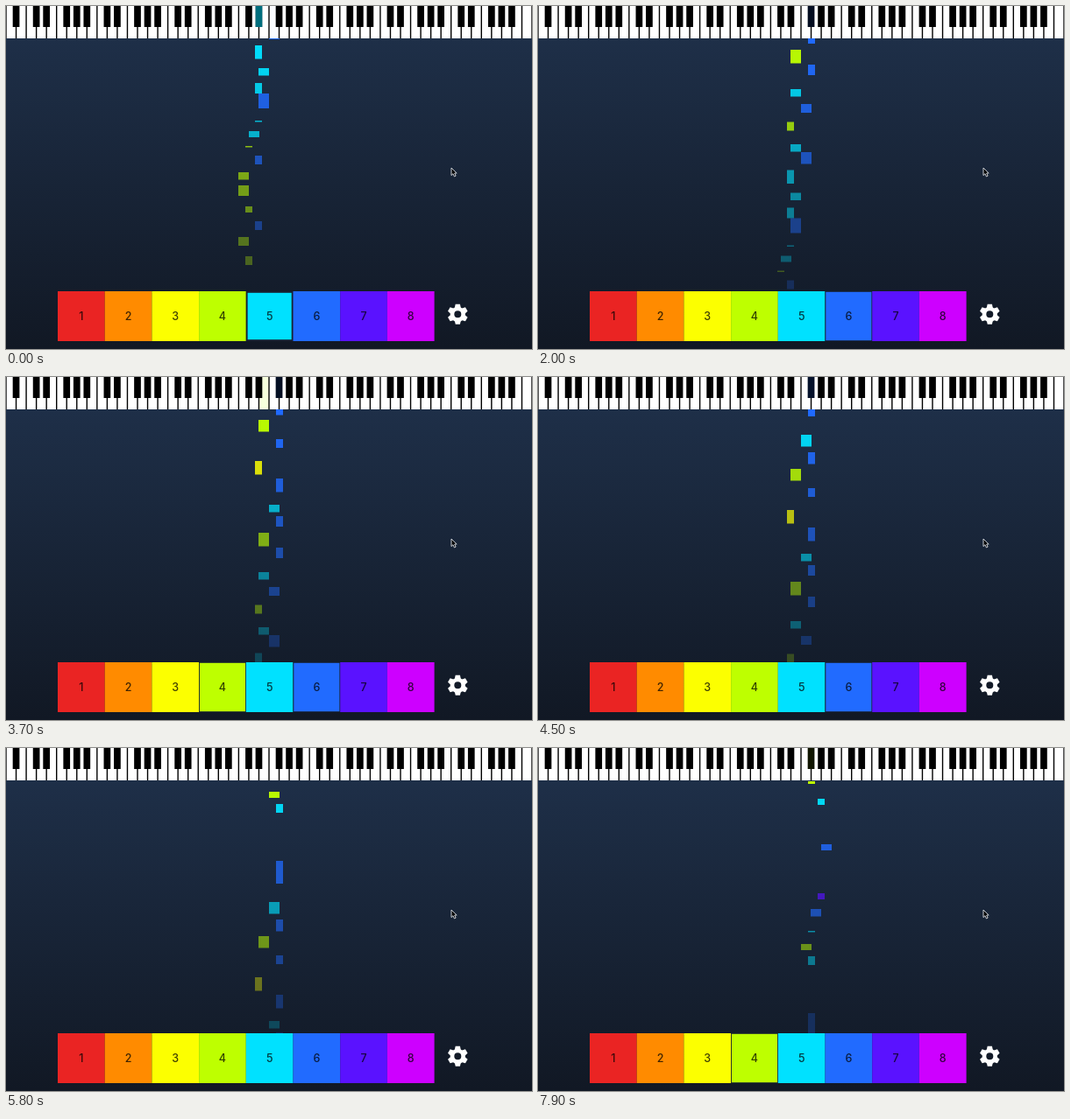
Animation, 600 px wide and 392 px high, one loop 8000 ms. Source, as an HTML page with a canvas:

```html
<!DOCTYPE html>
<html lang="en">
<head>
<meta charset="utf-8">
<title>Eight button piano</title>
<style>
html, body { margin: 0; width: 100%; height: 100%; overflow: hidden; background: #131b28; }
canvas { display: block; width: 600px; height: 392px; }
</style>
</head>
<body>
<canvas id="stage" width="600" height="392"></canvas>
<script>
const canvas = document.getElementById('stage');
const ctx = canvas.getContext('2d');
const W = 600, H = 392, LOOP = 8000, STEP = 100;
const KEY_W = W / 52, KEY_H = 37, BLACK_W = 7.7, BLACK_H = 24;
const BTN_X = 59, BTN_Y = 326, BTN_W = 53.7, BTN_H = 57;
const COLORS = ['#ea2423', '#ff8b00', '#fcff00', '#beff00',
                '#00e1ff', '#216bff', '#5a12ff', '#cd00ff'];

// Distance scrolled at a few moments: [ms, px]
const SCROLL = [[0, 0], [1000, 77.5], [2000, 142.5], [3000, 221.5],
                [4500, 326.5], [5800, 436.5], [7900, 610.5]];

// Note lengths in px
const tap = 1.5, brief = 7, short = 8.5, mid = 10, wide = 12,
      long = 13.5, longer = 15.5, held = 26;

const notes = [];

// Whole keys are black, halves white; each entry is a top at time zero
function lane(key, button, height, ...tops) {
  for (const top of tops) notes.push({ key, button, height, top });
}

lane(23.5, 4, mid, 264);
lane(23.5, 4, wide, 205);
lane(23.5, 4, short, 190);
lane(24, 4, mid, 286);
lane(24, 4, brief, 229);
lane(24, 4, tap, 160);
lane(24.5, 5, brief, 143);
lane(25, 3, longer, -174.5);
lane(25, 4, mid, -10);
lane(25, 5, tap, 131);
lane(25, 5, wide, 88);
lane(25, 5, longer, 45);
lane(25, 6, mid, 246, 171);
lane(25.5, 4, longer, -92.5);
lane(25.5, 4, long, -221.5);
lane(25.5, 5, short, 71, 15.5, -47.5);
lane(25.5, 6, longer + 1.5, 100);
lane(26.5, 4, brief, -386.5);
lane(26.5, 5, short, -124.5);
lane(26.5, 5, long, -260.5);
lane(26.5, 6, long, 24.5);
lane(26.5, 6, mid, -30.5);
lane(27, 4, tap * 2, -572.5);
lane(27, 5, mid, -372.5);
lane(27, 5, tap, -401.5);
lane(27, 6, wide, -75.5, -111.5);
lane(27, 6, longer, -154.5);
lane(27, 6, mid, -199.5);
lane(27, 6, long, -240.5);
lane(27, 6, held, -307.5);
lane(27.5, 6, short, -426.5);
lane(28, 5, brief, -552.5);
lane(28, 7, brief, -444.5);
lane(28.5, 6, brief, -500.5);

const clamp = v => Math.max(0, Math.min(1, v));
const isBlack = key => Number.isInteger(key);

function scrollAt(t) {
  let i = 1;
  while (i < SCROLL.length - 1 && t > SCROLL[i][0]) i++;
  const [t0, d0] = SCROLL[i - 1], [t1, d1] = SCROLL[i];
  return d0 + (d1 - d0) * (t - t0) / (t1 - t0);
}

function rect(color, x, y, w, h, alpha = 1) {
  ctx.globalAlpha = alpha;
  ctx.fillStyle = color;
  ctx.fillRect(x, y, w, h);
  ctx.globalAlpha = 1;
}

// How strongly a note lights its key and button
function glow(note, scroll) {
  const gap = note.top + scroll - KEY_H;
  const age = gap + note.height;
  if (age <= 0 || gap > 12.5) return 0;
  return Math.min(0.55, age / 48) * clamp((12.5 - gap) / 2);
}

function drawBackground() {
  const g = ctx.createLinearGradient(0, KEY_H, 0, H);
  g.addColorStop(0, '#1e2f48');
  g.addColorStop(1, '#111824');
  rect(g, 0, 0, W, H);
}

function drawNotes(scroll) {
  for (const n of notes) {
    const top = Math.max(KEY_H, n.top + scroll);
    const bottom = n.top + scroll + n.height;
    if (bottom <= KEY_H || top > BTN_Y) continue;
    const depth = clamp(((top + bottom) / 2 - KEY_H) / 350);
    const w = isBlack(n.key) ? 8 : 12;
    const x = Math.round(n.key * KEY_W - w / 2);
    rect(COLORS[n.button - 1], x, top, w, bottom - top, 1 - depth ** 1.15);
  }
}

function drawKeys(lit) {
  rect('#000', 0, 0, W, KEY_H);
  for (let i = 0; i < 52; i++) {
    const x = i * KEY_W + 0.7, w = KEY_W - 1.4;
    rect('#fff', x, 0, w, KEY_H);
    const hit = lit.get(i + 0.5);
    if (hit) rect(COLORS[hit.button - 1], x, 0, w, KEY_H, hit.level);
  }
  for (let i = 1; i < 52; i++) {
    if (i % 7 === 2 || i % 7 === 5) continue;
    const x = i * KEY_W - BLACK_W / 2;
    rect('#000', x, 0, BLACK_W, BLACK_H);
    const hit = lit.get(i);
    if (hit) rect(COLORS[hit.button - 1], x, 0, BLACK_W, BLACK_H, hit.level);
  }
}

function drawButtons(levels) {
  ctx.font = '500 12.5px Inter, "Open Sans", sans-serif';
  ctx.textAlign = 'center';
  ctx.textBaseline = 'middle';
  COLORS.forEach((color, i) => {
    const x = BTN_X + i * BTN_W, level = levels[i];
    const inset = level > 0.45 ? 1.8 : level > 0.08 ? 0.8 : 0;
    if (inset) rect('#172131', x, BTN_Y, BTN_W, BTN_H);
    rect(color, x + inset, BTN_Y + inset, BTN_W - 2 * inset, BTN_H - 2 * inset);
    ctx.fillStyle = 'rgba(0,0,0,0.75)';
    ctx.fillText(i + 1, x + BTN_W / 2, BTN_Y + 29);
  });
}

function drawGear() {
  ctx.save();
  ctx.translate(515.3, 352.3);
  ctx.fillStyle = '#fff';
  ctx.beginPath();
  ctx.arc(0, 0, 8.6, 0, Math.PI * 2);
  ctx.moveTo(4, 0);
  ctx.arc(0, 0, 4, 0, Math.PI * 2, true);
  ctx.fill();
  for (let i = 0; i < 6; i++) {
    ctx.beginPath();
    ctx.moveTo(-3.6, -7);
    ctx.lineTo(-2.6, -11.5);
    ctx.lineTo(2.6, -11.5);
    ctx.lineTo(3.6, -7);
    ctx.fill();
    ctx.rotate(Math.PI / 3);
  }
  ctx.restore();
}

function drawCursor() {
  const p = new Path2D('M508 185v8.6l2-1.9 1.4 3.2 1.7-.8-1.4-3.1h2.5z');
  ctx.fillStyle = '#000';
  ctx.strokeStyle = '#dfe3e8';
  ctx.lineWidth = 0.9;
  ctx.fill(p);
  ctx.stroke(p);
}

function draw(t) {
  const scroll = scrollAt(t);
  const lit = new Map(), levels = COLORS.map(() => 0);
  for (const n of notes) {
    const level = glow(n, scroll);
    if (!level) continue;
    lit.set(n.key, { button: n.button, level });
    levels[n.button - 1] = Math.max(levels[n.button - 1], level);
  }
  drawBackground();
  drawNotes(scroll);
  drawKeys(lit);
  drawButtons(levels);
  drawGear();
  drawCursor();
}

const start = performance.now();
function tick() {
  const t = Math.max(0, performance.now() - start) % LOOP;
  draw(Math.floor(t / STEP) * STEP);
  requestAnimationFrame(tick);
}
tick();
</script>
</body>
</html>
```
